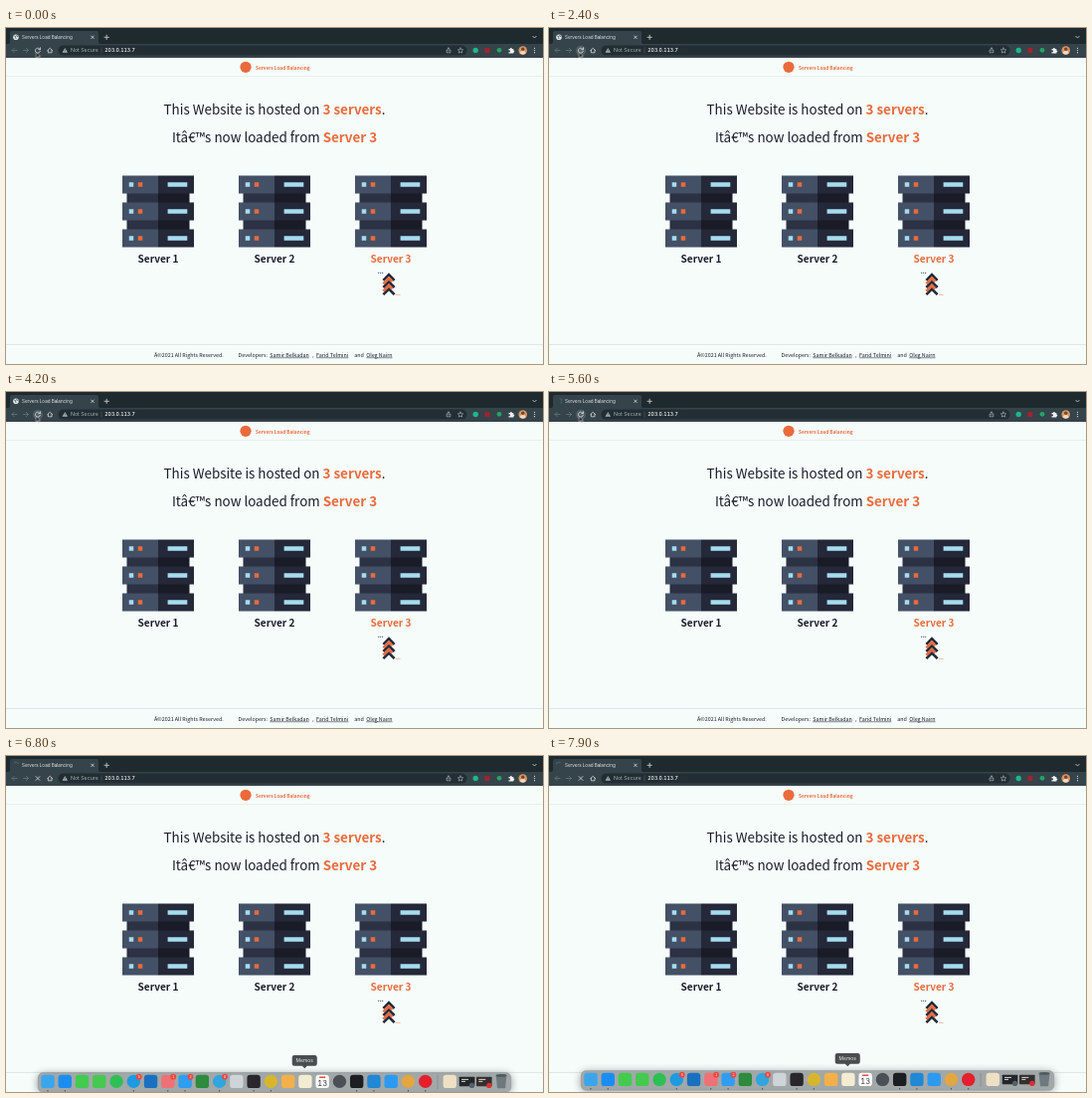
These frames come from a looping animation (540 by 338 pixels, 8000 ms). An HTML page:

```html
<!DOCTYPE html>
<html lang="en">
<head>
<meta charset="utf-8">
<title>Servers Load Balancing</title>
<style>
html, body { margin: 0; width: 100%; height: 100%; overflow: hidden; background: #f5fcfa; }
svg { display: block; width: 540px; height: 338px; }
text { font-family: "Noto Sans CJK JP", "Noto Sans CJK SC", "Noto Sans CJK", "Noto Sans", sans-serif; fill: #1b1c2a; }
.mid { text-anchor: middle; }
.bold { font-weight: 700; }
.hot { font-weight: 700; fill: #ea6a3c; }
.link { text-decoration: underline; }
.ui { font-family: Inter, Roboto, sans-serif; fill: #e4e9ea; font-variant-numeric: tabular-nums; }
.line { fill: none; stroke: #dfe5e6; stroke-width: .75; stroke-linecap: round; stroke-linejoin: round; }
.thin { stroke: #b9c3c6; stroke-width: .6; }
.dim { stroke: #6c797d; }

/* One shared 8 s clock; 100 ms is 1.25% */
.clock { animation: 8s infinite step-end; }
.s1 { animation-name: s1; }
.s2 { animation-name: s2; }
.s3 { animation-name: s3; }
.busy { animation-name: busy; }
.idle { animation-name: idle; }
.reload { animation-name: reload; }
.stop { animation-name: stop; }
.hover { animation-name: hover; animation-timing-function: linear; }
.cursor { animation-name: cursor; animation-timing-function: ease-in-out; }
.dock { animation-name: dock; animation-timing-function: ease-out; }
.tip { animation-name: tip; }
.spin { animation: spin 1s linear infinite; transform-origin: 10px 9px; }

@keyframes s1 { 0%, 22.5%, 40% { visibility: hidden } 11.25%, 35% { visibility: visible } 100% { visibility: hidden } }
@keyframes s2 { 0%, 28.75%, 50% { visibility: hidden } 22.5%, 40% { visibility: visible } 100% { visibility: hidden } }
@keyframes s3 { 0%, 28.75%, 50% { visibility: visible } 11.25%, 35% { visibility: hidden } 100% { visibility: visible } }
@keyframes busy {
  0%, 11.25%, 22.5%, 28.75%, 35%, 40% { opacity: 0 }
  7.5%, 18.75%, 25%, 31.25%, 37.5%, 61.25%, 100% { opacity: 1 }
}
@keyframes idle {
  0%, 11.25%, 22.5%, 28.75%, 35%, 40% { opacity: 1 }
  7.5%, 18.75%, 25%, 31.25%, 37.5%, 61.25%, 100% { opacity: 0 }
}
@keyframes reload { 0% { opacity: 1 } 72.5%, 100% { opacity: 0 } }
@keyframes stop { 0% { opacity: 0 } 72.5%, 100% { opacity: 1 } }
@keyframes hover { 0%, 1% { opacity: 0 } 2.5%, 4.9% { opacity: .1 } 5%, 72.4% { opacity: .14 } 72.5%, 100% { opacity: 0 } }
@keyframes cursor {
  0%, 71.5% { transform: translate(30.4px, 24.2px) }
  81.25%, 100% { transform: translate(300px, 338px) }
}
@keyframes dock { 0%, 80% { transform: translateY(50px) } 82.5% { transform: translateY(14px) } 85% { transform: translateY(2px) } 87.5%, 100% { transform: none } }
@keyframes tip { 0% { opacity: 0 } 83.75%, 100% { opacity: 1 } }
@keyframes spin { to { transform: rotate(-360deg) } }
</style>
</head>
<body>
<svg viewBox="0 0 540 338">
  <defs>
    <g id="rack">
      <g id="link"><path fill="#2c3144" d="M4.5 17.5H36V28H4.5z"/><path fill="#191b26" d="M36 17.5h31.5V28H36z"/></g>
      <use href="#link" y="27"/>
      <g id="unit">
        <path fill="#435066" d="M0 0h36v18H0z"/><path fill="#242838" d="M36 0h36v18H36z"/>
        <path fill="#a6dcef" d="M6.75 6.75h4.5v4.5h-4.5zM45.6 6.75h19.7v4.5H45.6z"/><path fill="#ea6a3c" d="M15.75 6.75h4.5v4.5h-4.5z"/>
      </g>
      <use href="#unit" y="27"/><use href="#unit" y="54"/>
    </g>
    <g id="arrows" fill="none" stroke="#242838" stroke-width="2.6">
      <path d="M-5.6 8.2L0 2.6L5.6 8.2M-5.6 15.4L0 9.8L5.6 15.4M-5.6 22.6L0 17L5.6 22.6"/>
      <path d="M-5.6 11.8L0 6.2L3.4 9.6M-5.6 19L0 13.4L3.4 16.8" stroke="#ea6a3c"/>
      <path d="M-11 .7h5.2" stroke-width=".8" stroke-dasharray="1.2 .8"/>
      <path d="M7 22.8h4.6" stroke="#f0a37f" stroke-width=".7"/>
    </g>
    <filter id="soft" x="-10%" y="-80%" width="120%" height="260%"><feGaussianBlur stdDeviation="4"/></filter>
  </defs>

  <!-- Page -->
  <path fill="#f5fcfa" d="M0 29h540v309H0z"/>
  <path stroke="#e2e8e7" stroke-width=".7" d="M0 48.5h540"/>
  <path stroke="#d9e0e0" stroke-width=".8" d="M0 318.4h540"/>
  <circle cx="241" cy="39.3" r="5.6" fill="#ea6a3c"/>
  <text class="hot" x="251" y="41.6" font-size="4.75">Servers Load Balancing</text>
  <text class="mid" x="270" y="86.7" font-size="13.42">This Website is hosted on <tspan class="hot">3 servers</tspan>.</text>
  <use href="#rack" x="117" y="148.5"/><use href="#rack" x="234" y="148.5"/><use href="#rack" x="351" y="148.5"/>
  <g id="states"></g>
  <g font-size="5.37">
    <text x="149" y="330.6">Â©2021 All Rights Reserved.</text>
    <text x="233.5" y="330.6">Developers:</text>
    <text class="link" x="265.3" y="330.6">Samir Belkadan</text>
    <text x="308" y="330.6">,</text>
    <text class="link" x="312" y="330.6">Farid Telmini</text>
    <text x="350.2" y="330.6">and</text>
    <text class="link" x="362.2" y="330.6">Oleg Nairn</text>
  </g>

  <!-- Browser -->
  <path fill="#1e2a2e" d="M0 0h540v17H0z"/>
  <path fill="#35434a" d="M0 16h540v14H0zM2 16q2 0 2-2V5q0-2 2-2h85q2 0 2 2v9q0 2 2 2z"/>
  <rect x="52.5" y="17.6" width="411" height="10" rx="5" fill="#222e33"/>
  <g class="clock idle"><circle cx="10" cy="9.2" r="2.8" fill="#e4e9ea"/><path d="M8.2 8l1.6.6-.3 1.4 1 1.2M11 6.9l-.3 1.2 1.8.8" fill="none" stroke="#35434a" stroke-width=".7"/></g>
  <g class="clock busy"><path class="spin" d="M7.4 10.2A2.8 2.8 0 0 1 10 6.2" fill="none" stroke="#667e87" stroke-width=".7"/></g>
  <text class="ui" x="16" y="10.9" font-size="4.55">Servers Load Balancing</text>
  <path class="line" d="M85.7 8l2.6 2.6M88.3 8l-2.6 2.6M99 9.3h4.4M101.2 7.1v4.4M529.8 8.3l1.7 1.7 1.7-1.7"/>
  <path class="line dim" d="M11 22.5H6M8.2 20.3L6 22.5l2.2 2.2M17.5 22.5h5M20.3 20.3l2.2 2.2-2.2 2.2"/>
  <circle class="clock hover" cx="32" cy="22.8" r="5" fill="#fff"/>
  <g class="clock reload"><path class="line" d="M34.2 21.5A2.5 2.5 0 1 0 34.4 23.3M34.5 19.8v1.9h-1.9"/></g>
  <g class="clock stop"><path class="line" d="M30 20.5l4 4M34 20.5l-4 4"/></g>
  <path class="line" d="M41.7 22.6l2.5-2.3 2.5 2.3M42.4 22.3v2.5h3.6v-2.5"/>
  <path d="M59.3 19.9l2.7 4.8h-5.4z" fill="#a9b3b6"/><path d="M59.3 21.6v1.4M59.3 23.6v.5" stroke="#222e33" stroke-width=".6"/>
  <text class="ui" x="65" y="24.4" font-size="5.25" style="fill:#a5b0b3">Not Secure</text>
  <path stroke="#5c686c" stroke-width=".5" d="M96 19.5v6"/>
  <text class="ui" x="99.3" y="24.4" font-size="5.1" font-weight="500" style="fill:#fff">203.0.113.7</text>
  <path class="line thin" d="M443.9 22h-.8v2.8h3.8V22h-.8M445 23.2v-3.3M444 20.8l1-.9 1 .9"/>
  <path class="line thin" d="M457 20l.8 1.7 1.9.2-1.4 1.3.4 1.9-1.7-1-1.7 1 .4-1.9-1.4-1.3 1.9-.2z"/>
  <circle cx="472.2" cy="22.5" r="2.7" fill="#18b88c"/>
  <rect x="481.4" y="20.1" width="4.9" height="4.9" fill="#a3222c"/>
  <circle cx="496" cy="22.3" r="2.4" fill="#23a566"/>
  <path fill="#eef1f1" d="M505.5 21h1.4a1 1 0 1 1 2 0h1.4v1.5a1 1 0 1 1 0 2v1h-4.8v-1.4a1 1 0 1 0 0-1.6z"/>
  <circle cx="519.7" cy="22.5" r="4.3" fill="#d99762"/><path d="M516.5 25.3q.8-2.3 3.2-2.3t3.2 2.3a4.3 4.3 0 0 1-6.4 0z" fill="#f0d9c4"/><circle cx="519.7" cy="21.2" r="1.7" fill="#784630"/>
  <g fill="#e4e9ea"><circle cx="531.5" cy="20.3" r=".6"/><circle cx="531.5" cy="22.5" r=".6"/><circle cx="531.5" cy="24.7" r=".6"/></g>

  <!-- Dock -->
  <g class="clock dock">
    <rect x="32" y="318" width="476" height="19" rx="6" fill="#000" opacity=".42" filter="url(#soft)"/>
    <rect x="32.3" y="316.6" width="475.4" height="19.6" rx="5" fill="#a2a7a8" stroke="#8d9394" stroke-width=".5"/>
    <path d="M434 319v14" stroke="#7f8688" stroke-width=".6"/>
    <g id="icons"></g>
    <g class="clock tip">
      <path d="M290 298.9h20.5q2.3 0 2.3 2.3v6.3q0 2.3-2.3 2.3h-7.7l-2.5 2.4-2.5-2.4H290q-2.3 0-2.3-2.3v-6.3q0-2.3 2.3-2.3z" fill="#494d4f"/>
      <text class="ui mid" x="300.3" y="306.2" font-size="5">Memos</text>
    </g>
  </g>

  <path class="clock cursor" d="M0 0v5.8l1.4-1.2.9 2 .9-.4-.9-2h1.8z" fill="#111" stroke="#fff" stroke-width=".5"/>
</svg>
<script>
const byId = id => document.getElementById(id);
const centers = [153, 270, 387];

byId('states').innerHTML = centers.map((cx, i) => {
  const labels = centers.map((x, j) =>
    `<text class="mid ${i === j ? 'hot' : 'bold'}" x="${x}" y="235.9" font-size="10.07">Server ${j + 1}</text>`).join('');
  return `<g class="clock s${i + 1}">
    <text class="mid" x="270" y="114.7" font-size="13.42">Itâ€™s now loaded from <tspan class="hot">Server ${i + 1}</tspan></text>
    ${labels}<use href="#arrows" x="${cx - 2}" y="245.6"/></g>`;
}).join('');

// Main colour of each dock icon; a leading "o" makes it round
const icons = `#3ba5ec #1b8df2 #43cb50 #45c94f o#2cc152 o#1c9be2 #1a70c0 #ee7275 #2f9df2 #2c8b3c
  o#2fa6dd #cfd4d8 #29272c o#d8b62c #f3b04a #f3ecd2 #fbfbfb o#4a5055 #1c1f22 #2088d4
  #2c9af0 o#e3a640 o#e51f2b #eee0c4 #23272b #34302f #6d797e`.split(/\s+/);
const badges = { 5: 5, 7: 1, 8: 2, 10: 8 };
const running = [0, 1, 5, 7, 8, 10, 12, 13, 18, 19, 21, 22];
const [calendar, firstWindow, lastWindow, bin] = [16, 24, 25, 26];

const tile = (x, y, w, h, rx, fill) =>
  `<rect x="${x - w / 2}" y="${y - h / 2}" width="${w}" height="${h}" rx="${rx}" fill="${fill}"/>`;

const iconAt = (spec, i) => {
  const x = 42 + i * 17.26 + (i > 22 ? 7.3 : 0), y = 325.4;
  const round = spec[0] === 'o', fill = spec.replace('o', '');
  let out;
  if (i === bin) {
    out = `<path d="M${x - 5.4} ${y - 6.5}h10.8l-1.4 13.4h-8z" fill="${fill}"/>
      <ellipse cx="${x}" cy="${y - 6}" rx="5.4" ry="1.4" fill="#4f5a5f"/>`;
  } else if (i === firstWindow || i === lastWindow) {
    out = tile(x, y, 15.6, 9.5, .6, fill) +
      `<path d="M${x - 5.5} ${y - 2}h7M${x - 5.5} ${y}h4" stroke="#d8d4cf"/>
      <circle cx="${x + 5}" cy="${y + 4}" r="2.6" fill="${i === lastWindow ? '#e02b34' : '#54616a'}"/>`;
  } else {
    out = tile(x, y, 13.4, 13.4, round ? 6.7 : 3.2, fill);
  }
  if (i === calendar) out += `<text class="ui mid" x="${x}" y="${y + 4.5}" font-size="7.5" style="fill:#333">13</text>
    <path d="M${x - 3} ${y - 4.2}h6" stroke="#e5483f" stroke-width="1.5"/>`;
  if (badges[i]) out += `<circle cx="${x + 5.4}" cy="${y - 4.7}" r="2.9" fill="#f0433d"/>
    <text class="ui mid" x="${x + 5.4}" y="${y - 3.2}" font-size="4">${badges[i]}</text>`;
  if (running.includes(i)) out += `<circle cx="${x}" cy="334.8" r=".65" fill="#2b3033"/>`;
  return out;
};
byId('icons').innerHTML = icons.map(iconAt).join('');
</script>
</body>
</html>
```
